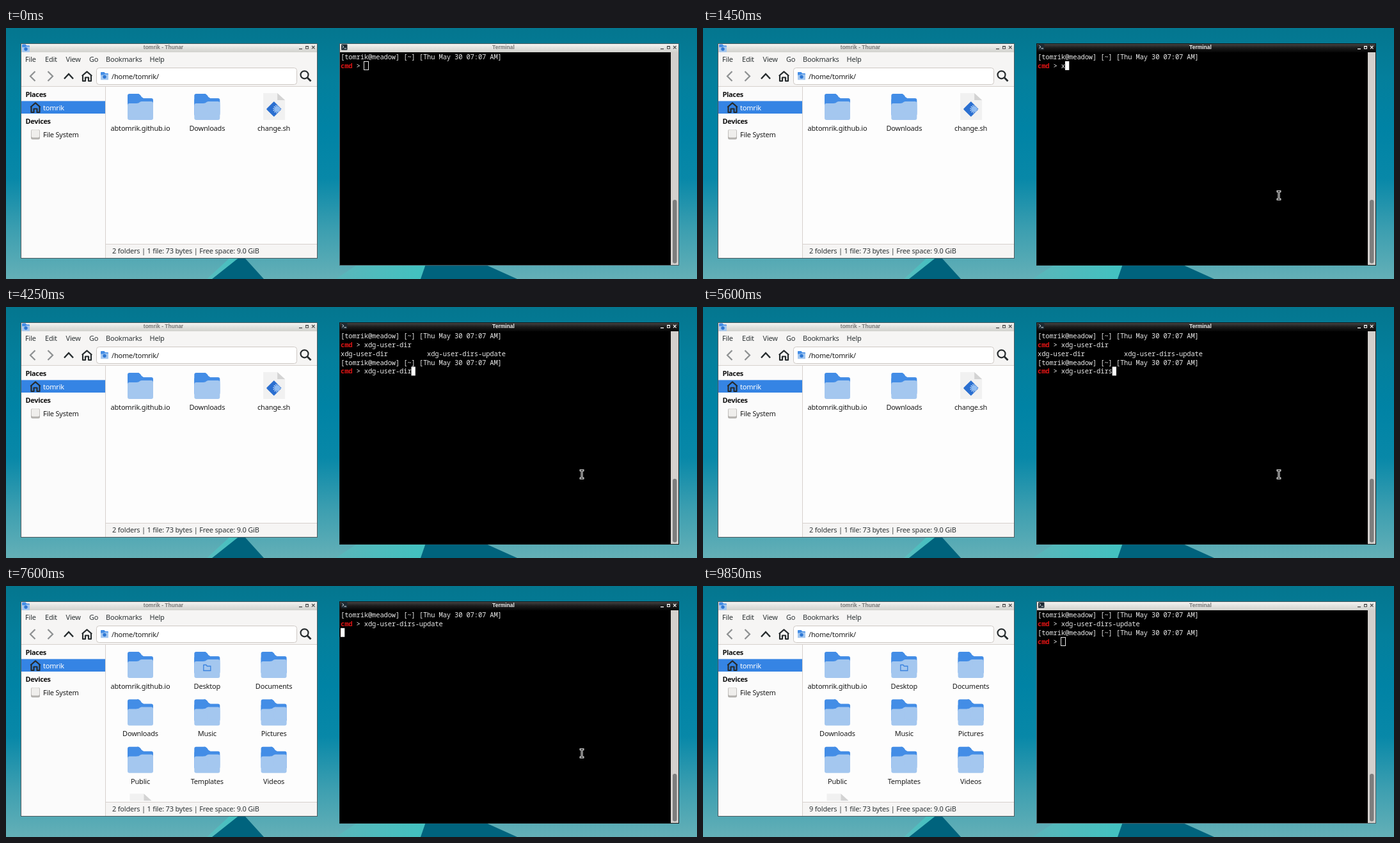
Recreate the animation shown at these times as an HTML page with a canvas. Size 1080 by 393 pixels, loop 9950 ms.

```html
<!DOCTYPE html>
<html lang="en">
<head>
<meta charset="utf-8">
<title>File manager and terminal</title>
<style>
html, body { margin: 0; width: 100%; height: 100%; overflow: hidden; background: #0a86a3; }
canvas { display: block; width: 1080px; height: 393px; }
</style>
</head>
<body>
<canvas id="stage"></canvas>
<script>
const W = 1080, H = 393, LOOP = 9950;
const canvas = document.getElementById('stage');
const ctx = canvas.getContext('2d');
const dpr = window.devicePixelRatio || 1;
canvas.width = W * dpr;
canvas.height = H * dpr;

const UI = '11px "Noto Sans", sans-serif';
const UI_BOLD = 'bold 11px "Noto Sans", sans-serif';
const TITLE = 'bold 8.5px "Liberation Sans", sans-serif';
const MONO = '10.5px "Noto Sans Mono", monospace';
const MONO_BOLD = 'bold 10.5px "Noto Sans Mono", monospace';

const USER = 'tomrik';
const PROMPT = `[${USER}@meadow] [~] [Thu May 30 07:07 AM]`;
const LEAD = 'cmd > ';
const COMMAND = 'xdg-user-dirs-update ';
const CELL = 6.14, ROW = 13.83, TERM_X = 523, TERM_Y = 38.2;

// [time, characters on the command line]
const TYPING = [
  [1350, 1], [1600, 2], [1750, 3], [2000, 4], [2200, 5], [2350, 6], [2600, 7],
  [2650, 8], [2950, 12], [5600, 13], [5750, 14], [6050, 21]
];
const LISTED = 4250, ENTERED = 7000, CREATED = 7600, PROMPTED = 7650, COUNTED = 7950;

function rect(x, y, w, h, color) {
  ctx.fillStyle = color;
  ctx.fillRect(x, y, w, h);
}

function poly(points, color) {
  ctx.beginPath();
  points.forEach(([x, y]) => ctx.lineTo(x, y));
  ctx.closePath();
  ctx.fillStyle = color;
  ctx.fill();
}

function line(points, color, width) {
  ctx.beginPath();
  points.forEach(([x, y]) => ctx.lineTo(x, y));
  ctx.strokeStyle = color;
  ctx.lineWidth = width;
  ctx.stroke();
}

function round(x, y, w, h, r, color) {
  ctx.beginPath();
  ctx.roundRect(x, y, w, h, r);
  ctx.fillStyle = color;
  ctx.fill();
}

function text(str, x, y, font = UI, color = '#1c1c1c', align = 'left', spacing = -0.2) {
  ctx.font = font;
  ctx.letterSpacing = spacing + 'px';
  ctx.textAlign = align;
  ctx.fillStyle = color;
  ctx.fillText(str, x, y);
}

function gradient(x0, y0, x1, y1, colors) {
  const g = ctx.createLinearGradient(x0, y0, x1, y1);
  colors.forEach((c, i) => g.addColorStop(i / (colors.length - 1), c));
  return g;
}

const fade = (y0, y1, ...colors) => gradient(0, y0, 0, y1, colors);
const sweep = (x0, x1, ...colors) => gradient(x0, 0, x1, 0, colors);

function desktop() {
  rect(0, 0, W, H, fade(0, H, '#04768f', '#047f9c', '#0083a5', '#0888a8', '#3b9eb0', '#64b0b7'));
  const dark = '#00637d';
  poly([[314, 393], [352, 358], [368, 358], [322, 393]], sweep(314, 366, '#5abdbf', '#40c0c0'));
  poly([[322, 393], [366, 358], [374, 361], [403, 393]], dark);
  poly([[515, 393], [550, 370], [656, 370], [648, 393]], sweep(515, 650, '#5ab6ba', '#42c1c0'));
  poly([[648, 393], [656, 370], [748, 370], [799, 393]], dark);
}

function frame(x, y, w, h, title, active) {
  rect(x, y, w, h, active ? '#161616' : '#4c5a5f');
  rect(x + 1, y + 1, w - 2, 13,
    active ? fade(y, y + 14, '#4a4a4a', '#1c1c1c', '#050505') : fade(y, y + 14, '#f8f8f6', '#e2e2df', '#d2d2ce'));
  text(title, x + w / 2 - 9, y + 9, TITLE, active ? '#eeeeee' : '#777777', 'center', 0);
  const ink = active ? '#f0f0f0' : '#505050';
  const r = x + w;
  rect(r - 29, y + 8, 5, 1.4, ink);
  ctx.strokeStyle = ink;
  ctx.lineWidth = 1;
  ctx.strokeRect(r - 18.5, y + 4.5, 4, 4);
  rect(r - 19, y + 4, 5, 1.6, ink);
  line([[r - 9, y + 4], [r - 4.5, y + 8.6]], ink, 1.3);
  line([[r - 4.5, y + 4], [r - 9, y + 8.6]], ink, 1.3);
}

function folder(x, y, scale = 1) {
  ctx.save();
  ctx.translate(x, y);
  ctx.scale(scale, scale);
  round(0, 0, 19, 20, 3, '#438de6');
  poly([[15, 0], [17, 0], [20, 2], [22, 5], [25, 7], [25, 12], [15, 12]], '#438de6');
  round(0, 7, 40, 28, 3, '#438de6');
  round(0, 15, 40, 26, 3, '#a4c7ef');
  round(20, 12, 20, 20, 3, '#a4c7ef');
  poly([[14, 15], [17, 14.6], [20, 12.6], [23, 12], [23, 20], [14, 20]], '#a4c7ef');
  ctx.restore();
}

function homeFolder(x, y) {
  folder(x, y, 0.3);
  ctx.beginPath();
  ctx.arc(x + 6, y + 7.5, 2.7, 0, 7);
  ctx.fillStyle = '#2f78d4';
  ctx.fill();
}

function paper(x, y) {
  poly([[x, y], [x + 22, y], [x + 34, y + 11], [x + 34, y + 42], [x, y + 42]], '#f1f1f1');
  poly([[x + 22, y], [x + 34, y + 11], [x + 22, y + 11]], '#d3d3d3');
}

function script(x, y) {
  paper(x, y);
  const cx = x + 16.7, cy = y + 25;
  ctx.save();
  ctx.translate(cx, cy);
  ctx.rotate(Math.PI / 4);
  round(-8.6, -8.6, 17.2, 17.2, 1.5, '#2b6fd0');
  ctx.beginPath();
  ctx.rect(-8.6, -8.6, 17.2, 17.2);
  ctx.clip();
  ctx.rotate(-Math.PI / 4);
  ctx.beginPath();
  ctx.arc(5, 0, 4.6, 0, 7);
  ctx.fillStyle = '#8fbcf2';
  ctx.fill();
  ctx.setLineDash([1.4, 1.5]);
  ctx.beginPath();
  ctx.arc(5, 0, 5.6, 0, 7);
  ctx.strokeStyle = '#c8def8';
  ctx.lineWidth = 1.8;
  ctx.stroke();
  ctx.restore();
}

function house(x, y, s) {
  ctx.lineJoin = 'round';
  line([[x + 2, y + 7], [x + 2, y + s - 1], [x + 6, y + s - 1], [x + 6, y + 10.5], [x + s - 6, y + 10.5],
    [x + s - 6, y + s - 1], [x + s - 2, y + s - 1], [x + s - 2, y + 7]], '#262b2d', 2.2);
  line([[x + 0.8, y + 8], [x + s / 2, y + 1.4], [x + s - 0.8, y + 8]], '#262b2d', 2.2);
  ctx.lineJoin = 'miter';
}

function toolbar() {
  rect(24, 38, 462, 54, '#f6f5f4');
  [['File', 30], ['Edit', 61], ['View', 93.5], ['Go', 130], ['Bookmarks', 156], ['Help', 224.5]]
    .forEach(([s, x]) => text(s, x, 53, UI, '#2e3436'));
  line([[45.5, 68], [38, 75.5], [45.5, 83]], '#8d9091', 2.2);
  line([[65.5, 68], [73, 75.5], [65.5, 83]], '#8d9091', 2.2);
  line([[91, 79.5], [98, 72], [105, 79.5]], '#262b2d', 2.4);
  house(118, 67, 17);
  ctx.beginPath();
  ctx.roundRect(141.5, 62.5, 313, 26, 4);
  ctx.fillStyle = '#ffffff';
  ctx.fill();
  ctx.strokeStyle = '#cdc8c4';
  ctx.lineWidth = 1;
  ctx.stroke();
  homeFolder(148, 69);
  text(`/home/${USER}/`, 165, 79.5);
  ctx.beginPath();
  ctx.arc(466.5, 73.3, 6, 0, 7);
  ctx.strokeStyle = '#262b2d';
  ctx.lineWidth = 2.2;
  ctx.stroke();
  line([[471, 77.8], [476.5, 83.2]], '#262b2d', 2.8);
  rect(24, 91, 462, 1, '#d6d1cd');
}

function sidebar() {
  rect(24, 92, 131, 268, '#fbfbfb');
  text('Places', 30.5, 107.5, UI_BOLD, '#111', 'left', -0.35);
  rect(24, 114.4, 131, 19.6, '#3584e4');
  house(37.5, 116, 17);
  text(USER, 58, 128.5, UI, '#ffffff');
  text('Devices', 30.5, 150, UI_BOLD, '#111', 'left', -0.35);
  round(39, 159, 14, 15.5, 2.5, '#b4b2af');
  round(39.8, 159.3, 12.4, 12.2, 2, '#efeeec');
  text('File System', 58, 170.5);
  rect(155, 92, 1, 268, '#d6d1cd');
}

function files(t) {
  const own = `ab${USER}.github.io`;
  const names = t < CREATED
    ? [own, 'Downloads', 'change.sh']
    : [own, 'Desktop', 'Documents', 'Downloads', 'Music', 'Pictures', 'Public', 'Templates', 'Videos', 'change.sh'];
  rect(156, 92, 330, 246, '#fdfdfd');
  ctx.save();
  ctx.beginPath();
  ctx.rect(156, 92, 330, 244.5);
  ctx.clip();
  names.forEach((name, i) => {
    const cx = 210 + (i % 3) * 104.3;
    const y = 103 + Math.floor(i / 3) * 74.4;
    if (name.endsWith('.sh')) script(cx - 16.5, y - 1);
    else folder(cx - 20, y);
    if (name === 'Desktop') {
      line([[cx - 5.5, y + 20.5], [cx - 1.5, y + 20.5], [cx, y + 22.5], [cx + 5.5, y + 22.5],
        [cx + 5.5, y + 29.5], [cx - 5.5, y + 29.5], [cx - 5.5, y + 20]], '#3a82de', 1.3);
    }
    text(name, cx, y + 58, UI, '#1c1c1c', 'center');
  });
  ctx.restore();
}

function fileManager(t) {
  frame(23, 24, 464, 337, `${USER} - Thunar`, false);
  homeFolder(25, 25.5);
  toolbar();
  sidebar();
  files(t);
  rect(156, 338, 330, 22, '#f6f5f4');
  rect(156, 338, 330, 1, '#d6d1cd');
  text(`${t < COUNTED ? 2 : 9} folders | 1 file: 73 bytes | Free space: 9.0 GiB`, 166, 353, UI, '#2e3436');
}

function screenRows(t) {
  const count = TYPING.reduce((n, [at, len]) => t >= at ? len : n, 0);
  const typed = LEAD + COMMAND.slice(0, count);
  if (t < LISTED) return [PROMPT, typed];
  const first = LEAD + COMMAND.slice(0, 12);
  if (t < ENTERED) return [PROMPT, first, 'xdg-user-dir'.padEnd(22) + 'xdg-user-dirs-update', PROMPT, typed];
  const done = LEAD + COMMAND;
  return t < PROMPTED ? [PROMPT, done, ''] : [PROMPT, done, PROMPT, LEAD];
}

function terminal(t, active) {
  frame(521, 24, 531, 348, 'Terminal', active);
  round(524, 25.5, 9.5, 9, 1, '#1d2a33');
  line([[525.5, 27.5], [528, 29.5], [525.5, 31.5]], '#e4ecf0', 1);
  rect(528.5, 31.5, 3.5, 1, '#e4ecf0');
  rect(522, 38, 517, 333, '#000000');
  rect(1039, 38, 12, 333, '#d3d0cd');
  const top = t < ENTERED ? 269 : 294;
  round(1042, top, 6.5, 368.5 - top, 3.2, '#7d7d7d');

  const rows = screenRows(t);
  ctx.font = MONO;
  ctx.letterSpacing = '0px';
  const spacing = CELL - ctx.measureText('m').width;
  rows.forEach((row, i) => {
    const y = Math.round(TERM_Y + i * ROW + 10.9);
    const isCommand = row.startsWith(LEAD);
    if (isCommand) text('cmd', TERM_X, y, MONO_BOLD, '#dc1414', 'left', spacing);
    const from = isCommand ? 4 : 0;
    text(row.slice(from), TERM_X + from * CELL, y, MONO, '#e8e8e8', 'left', spacing);
  });

  const last = rows.length - 1;
  const x = TERM_X + rows[last].length * CELL;
  const y = TERM_Y + last * ROW;
  if (active) {
    rect(x, y, 6.3, 13.9, '#ffffff');
  } else {
    ctx.strokeStyle = '#e8e8e8';
    ctx.lineWidth = 1;
    ctx.strokeRect(Math.round(x) - 0.5, Math.round(y) + 0.5, 7, 13);
  }
}

// The pointer glides in, is nudged, hides while idle, then leaves the stage.
function pointerAt(t) {
  if (t < 650 || t >= 9850 || (t >= 9150 && t < 9550)) return null;
  if (t < 9050) {
    const away = Math.pow(1 - Math.min(1, (t - 600) / 600), 2);
    return [900 + 185 * away, 262 + 134 * away];
  }
  const away = Math.pow(Math.max(0, (t - 9500) / 350), 1.5);
  return [915 + 170 * away, 303 + 93 * away];
}

function isActive(t, spot) {
  if (spot) return spot[0] < 1052 && spot[1] < 372;
  return t >= 9150 && t < 9550;
}

function pointer([x, y], overText) {
  ctx.save();
  ctx.translate(Math.round(x), Math.round(y));
  if (overText) {
    [['#ffffff', 3, 0.9], ['#000000', 1, 0]].forEach(([color, width, cap]) => {
      line([[-2.5 - cap, -6.2], [2.5 + cap, -6.2]], color, width);
      line([[0, -6.2], [0, 6.2]], color, width);
      line([[-2.5 - cap, 6.2], [2.5 + cap, 6.2]], color, width);
    });
  } else {
    const shape = [[0, 0], [0, 14], [3.3, 11], [5.5, 16], [7.7, 15], [5.6, 10.3], [10, 10.3], [0, 0]];
    poly(shape, '#111111');
    line(shape, '#ffffff', 1);
  }
  ctx.restore();
}

function draw(now) {
  const t = Math.floor(now % LOOP / 50) * 50;
  const spot = pointerAt(t);
  const active = isActive(t, spot);
  ctx.setTransform(dpr, 0, 0, dpr, 0, 0);
  desktop();
  fileManager(t);
  terminal(t, active);
  if (spot) pointer(spot, active && spot[0] < 1039);
}

const start = performance.now();
function tick() {
  draw(performance.now() - start);
  requestAnimationFrame(tick);
}
tick();
</script>
</body>
</html>
```
